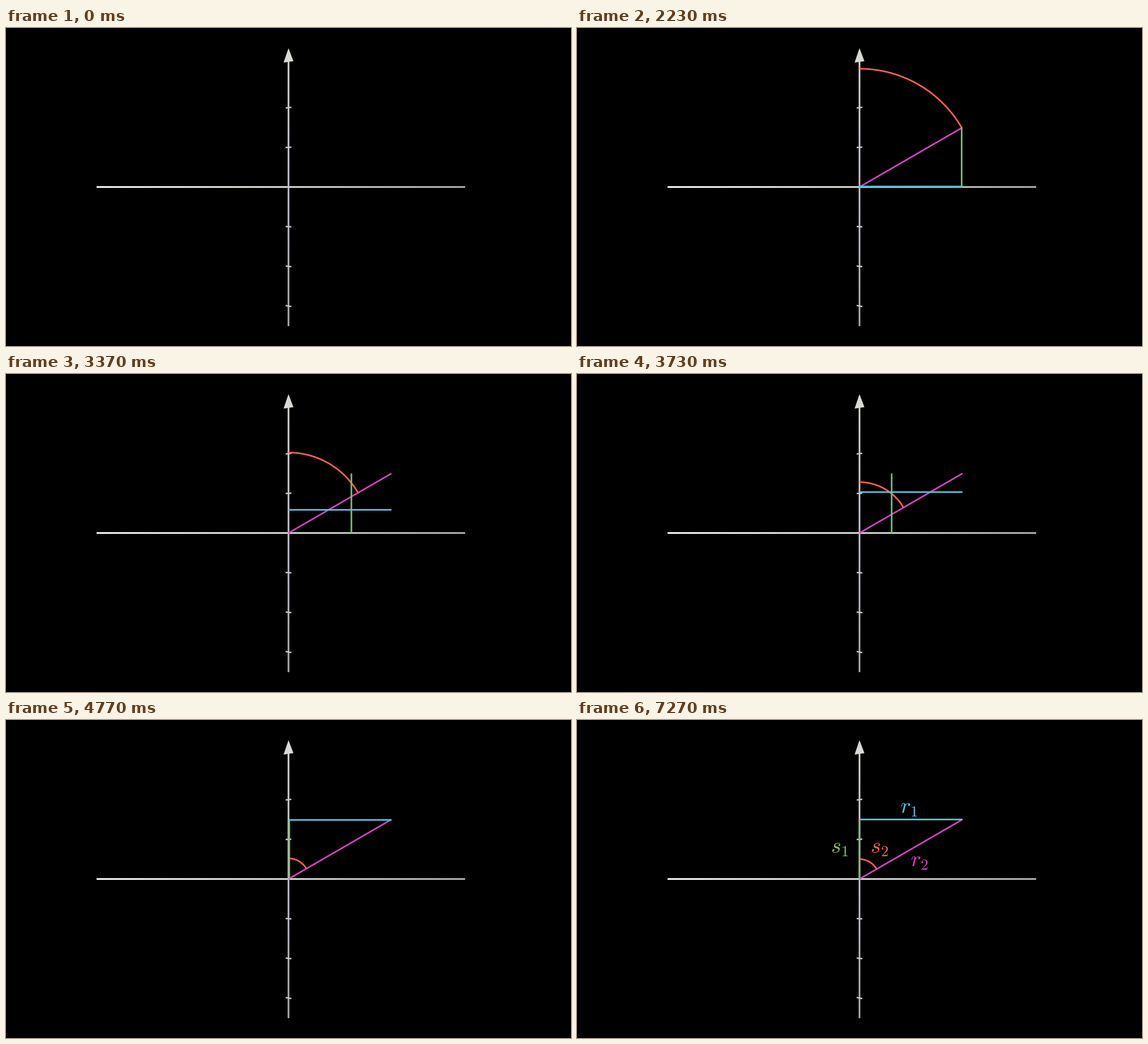
A matplotlib script for the animation above (9010 ms loop, 998 px wide and 561 px high).

```python
import numpy as np
import matplotlib.pyplot as plt
from matplotlib.animation import FuncAnimation
from matplotlib.collections import LineCollection
from matplotlib.colors import LinearSegmentedColormap, to_rgba
from matplotlib.patches import Polygon
from matplotlib.textpath import TextPath

W, H, DPI = 998, 561, 64
FRAMES, INTERVAL = 530, 17
STEP = 100 / 3                      # the motion advances at 30 steps a second
OX, OY, UNIT = 499, 280.5, 70
BLUE, GREEN, RED, PINK = "#58C4DD", "#83C167", "#FC6255", "#D147BD"

plt.rcParams["mathtext.fontset"] = "cm"
fig = plt.figure(figsize=(W / DPI, H / DPI), dpi=DPI, facecolor="black")
ax = fig.add_axes([0, 0, 1, 1])
ax.set(xlim=(0, W), ylim=(H, 0))
ax.axis("off")


def px(width):
    return width * 72 / DPI


def smooth(t):
    t = np.clip(t, 0, 1)
    low = 1 / (1 + np.exp(5))
    return np.clip((1 / (1 + np.exp(-10 * (t - 0.5))) - low) / (1 - 2 * low), 0, 1)


def lerp(a, b, t):
    return a + (b - a) * t


def shaded_line(start, end, colors, width=3, parts=60):
    pts = np.linspace(start, end, parts + 1)
    along = int(start[0] == end[0])
    pts[:, along] = np.round(pts[:, along])
    cmap = LinearSegmentedColormap.from_list("shade", colors)
    ax.add_collection(LineCollection(
        np.stack([pts[:-1], pts[1:]], axis=1), linewidths=px(width),
        colors=cmap(np.linspace(0, 1, parts)), snap=False, zorder=1))


def stroke(color, zorder, width=2.8):
    line, = ax.plot([], [], color=color, lw=px(width), zorder=zorder,
                    solid_capstyle="butt", snap=False)
    return line


# Axes
shaded_line((160, OY), (811, OY), ["#f6f6f6", "#d6d6d2", "#aeaeae"])
shaded_line((OX, 58), (OX, 526), ["#d8d8d4", "#c2c2ce", "#acacac"])
ax.add_patch(Polygon([(499, 35.5), (507.7, 58.5), (490.3, 61)],
                     color="#d8d8d4", lw=0, zorder=2))
for n in (-3, -2, -1, 1, 2):
    y = OY - n * UNIT
    slant = -n * 0.32
    ax.plot([OX - 5, OX + 5], [y - slant, y + slant], color="#c8c8c8",
            lw=px(2.5), solid_capstyle="butt", snap=False, zorder=2)

pink, red = stroke(PINK, 3), stroke(RED, 4)
green, blue = stroke(GREEN, 5), stroke(BLUE, 6)
TIP_X = 3 * UNIT * np.cos(np.pi / 6)
TIP_Y = 3 * UNIT * np.sin(np.pi / 6)


class Label:
    """Math label whose glyphs are outlined, then filled."""

    def __init__(self, text, center, color, size=38.5):
        polys = TextPath((0, 0), text, size=size * 10).to_polygons()
        polys = [np.array(p) * (0.1, -0.1) for p in polys]
        ink = np.vstack(polys)
        shift = np.array(center) - (ink.min(axis=0) + ink.max(axis=0)) / 2
        self.color = color
        self.outlines = [p + shift for p in polys]
        self.fills = [ax.add_patch(Polygon(p, lw=0, zorder=7))
                      for p in self.outlines]
        self.edges = [stroke(color, 8, 1.4) for _ in polys]

    def write(self, t, lag=0.2):
        span = 1 + lag * (len(self.outlines) - 1)
        for i, pts in enumerate(self.outlines):
            a = np.clip(t * span - i * lag, 0, 1)
            drawn, filled = min(2 * a, 1), max(2 * a - 1, 0)
            lengths = np.hypot(*np.diff(pts, axis=0).T)
            s = np.concatenate([[0], np.cumsum(lengths)])
            at = np.linspace(0, drawn * s[-1], 150)
            edge = self.edges[i]
            edge.set_data(np.interp(at, s, pts[:, 0]), np.interp(at, s, pts[:, 1]))
            edge.set_linewidth(px(1.4 * (1 - filled)))
            edge.set_visible(0 < a < 1)
            self.fills[i].set_facecolor(to_rgba(self.color, filled))


labels = [Label("$r_1$", (586.5, 158.3), BLUE),
          Label("$s_1$", (464.5, 228.5), GREEN),
          Label("$s_2$", (535, 228.5), RED),
          Label("$r_2$", (605, 252.3), PINK)]


def update(i):
    step = min(int((i * INTERVAL + INTERVAL - 1) / STEP), 269)
    grow = smooth(step / 30)
    move = smooth((step - 60) / 90)

    pink.set_data([OX, OX + TIP_X * grow], [OY, OY - TIP_Y * grow])
    y = OY - TIP_Y * move
    blue.set_data([OX, OX + TIP_X * grow], [y, y])
    x = OX + TIP_X * (1 - move)
    green.set_data([x, x], [OY, OY - TIP_Y * grow])
    r = lerp(3, 0.5, move) * UNIT
    angle = np.pi / 6 + np.linspace(0, np.pi / 3 * grow, 80)
    red.set_data(OX + r * np.cos(angle), OY - r * np.sin(angle))
    for line in (pink, blue, green, red):
        line.set_visible(step > 0)

    for label in labels:
        label.write((step - 180) / 30)
    return []


anim = FuncAnimation(fig, update, frames=FRAMES, interval=INTERVAL,
                     init_func=lambda: update(0), repeat=True)
plt.show()
```
